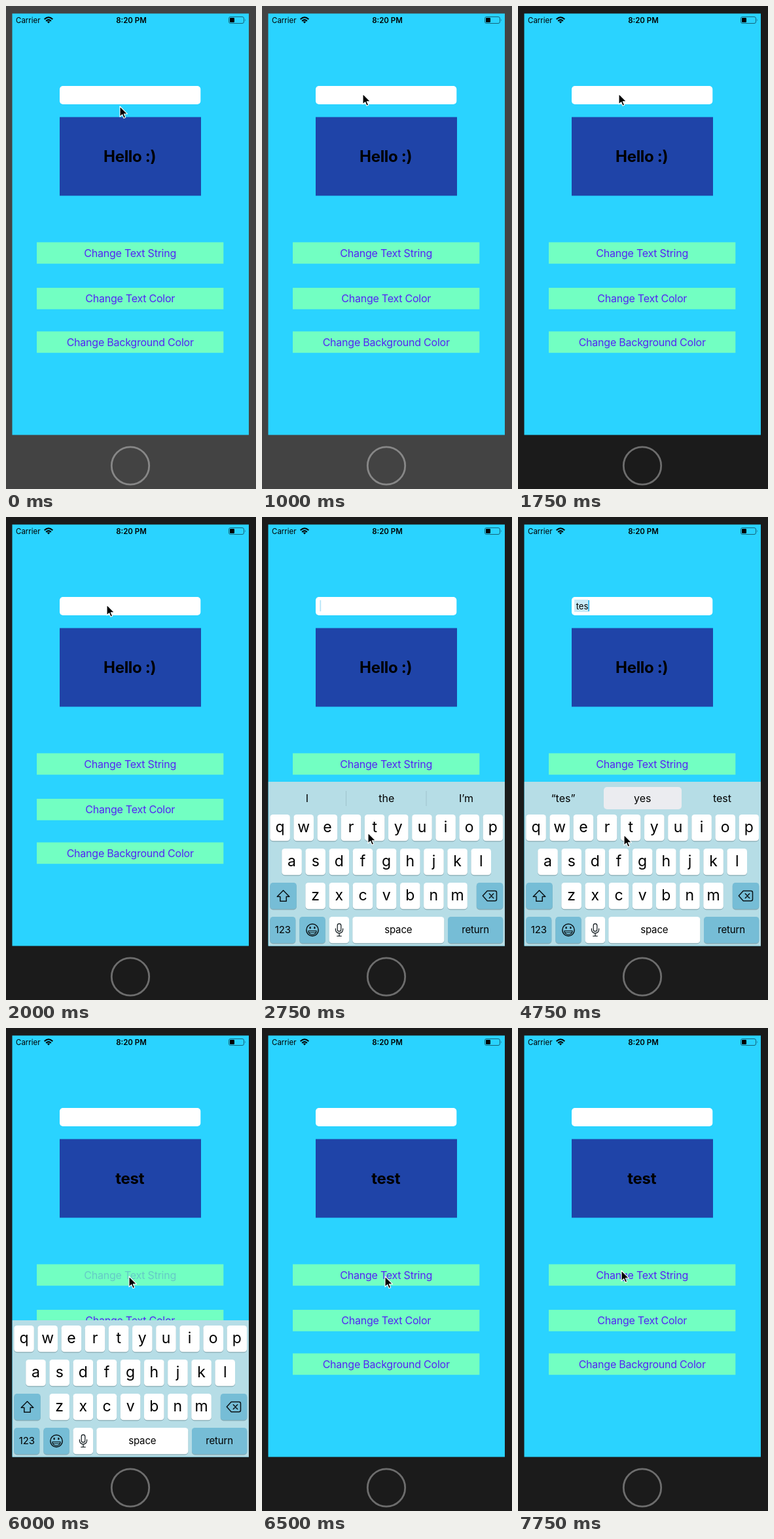
An HTML page that plays this animation: 382 px wide and 737 px high, repeating every 8000 ms.

```html
<!DOCTYPE html>
<html lang="en">
<head>
<meta charset="utf-8">
<style>
  html, body { margin: 0; width: 100%; height: 100%; overflow: hidden; background: #1b1b1b; }
  svg { display: block; width: 100vw; height: 100vh; font-family: Inter, "Open Sans", sans-serif; }
  .mid { text-anchor: middle; }
  .btn { font-size: 16px; letter-spacing: -.23px; fill: #5423f5; }
  .letter { font-size: 23px; }
  .word { font-size: 15px; letter-spacing: -.15px; }
  .hint { font-size: 16px; }
  .line { fill: none; stroke: #0b1418; stroke-width: 1.5; stroke-linejoin: round; stroke-linecap: round; }
</style>
</head>
<body>
<svg viewBox="0 0 382 737">
  <defs><clipPath id="screen"><rect x="9.5" y="11.5" width="361.5" height="643"/></clipPath></defs>
  <rect id="bezel" width="382" height="737"/>
  <circle id="home" cx="190" cy="701.5" r="28.7" fill="none" stroke-width="2.8"/>
  <rect x="9.5" y="11.5" width="361.5" height="643" fill="#2ad3ff"/>

  <text x="15" y="25.5" font-size="11.5">Carrier</text>
  <g fill="none" stroke="#000" stroke-width="2.1">
    <path d="M58.7 20.3Q65 14.2 71.3 20.3M61.2 22.9Q65 19.2 68.8 22.9"/>
    <path d="M62.8 24.1Q65 22.3 67.2 24.1L65 26.4Z" fill="#000" stroke="none"/>
  </g>
  <text class="mid" x="191.5" y="25.5" font-size="11.5" font-weight="600">8:20 PM</text>
  <rect x="340.5" y="16.5" width="23" height="10" rx="2.5" fill="none" stroke="#14657a"/>
  <rect x="342" y="18" width="7" height="7" rx="1" fill="#000"/>
  <path d="M365 19.7Q366.6 21.5 365 23.3Z" fill="#14657a"/>

  <rect x="82" y="122" width="215.3" height="28" rx="5" fill="#fff"/>
  <rect id="mark" x="86" y="126" height="19" fill="#c9ebf8"/>
  <text id="field" x="88.7" y="140.5" font-size="13.2"></text>
  <rect id="caret" y="127" width="1.8" height="17" fill="#2fb5ec"/>

  <rect x="82" y="169.5" width="216" height="120" fill="#1f44a8"/>
  <text id="label" class="mid" x="189.2" y="238" font-size="24" font-weight="700" letter-spacing="-.3"></text>

  <g id="buttons"></g>
  <g clip-path="url(#screen)"><g id="keyboard">
    <rect id="panel" x="9.5" width="361.5" fill="#b6dde6"/>
    <g id="bar">
      <path id="dividers" d="M128.5 418V441M251 418V441" stroke="#a0c4cd"/>
      <rect id="pick" x="131" y="412" width="119" height="34" rx="5" fill="#ebecf0"/>
    </g>
    <g id="keys"></g>
    <g class="line">
      <path d="M32.5 569.8L41.8 579.2H37.2V586.3H27.8V579.2H23.2Z"/>
      <path d="M344.2 570.5H356Q358.5 570.5 358.5 573V583.2Q358.5 585.7 356 585.7H344.2L337.3 578.1Z"/>
      <path d="M347.3 574.8L353.7 581.4M353.7 574.8L347.3 581.4"/>
      <circle cx="77" cy="630.3" r="9.2"/>
      <path d="M70.8 631.5H83.2A6.2 5.8 0 0 1 70.8 631.5ZM72 634H82" stroke-width="1.2"/>
      <path d="M73.6 626V627.4M80.4 626V627.4" stroke-width="2.2"/>
      <rect x="115.2" y="620.6" width="5.6" height="11.6" rx="2.8" stroke-width="1.2"/>
      <path d="M112.4 628V629.5A5.6 5.6 0 0 0 123.6 629.5V628M118 635.2V639.5M114.7 639.5H121.3" stroke-width="1.2"/>
    </g>
  </g></g>
  <path id="pointer" d="M0 0V16L3.7 12.7L6 18.2L8.7 17.1L6.3 11.7H11.4Z" stroke="#fff" stroke-width="1.1" stroke-linejoin="round"/>
</svg>
<script>
const LOOP = 8000, STEP = 250;
const $ = id => document.getElementById(id);

function add(parent, tag, attrs, text = "") {
  const el = document.createElementNS("http://www.w3.org/2000/svg", tag);
  for (const name in attrs) el.setAttribute(name, attrs[name]);
  el.textContent = text;
  parent.append(el);
  return el;
}
const set = (id, name, value) => $(id).setAttribute(name, value);
const show = (id, on) => set(id, "visibility", on ? "inherit" : "hidden");

const buttons = [["Change Text String", 360.5], ["Change Text Color", 430], ["Change Background Color", 496.5]]
  .map(([text, y]) => {
    add($("buttons"), "rect", { x: 47, y, width: 285.3, height: 32.7, fill: "#72ffc2" });
    return add($("buttons"), "text", { class: "mid btn", x: 189.7, y: y + 22 }, text);
  });

function key(x, y, width, text = "", dark = false, kind = "word") {
  const box = { x, width, height: 40.3, rx: 4.5 };
  add($("keys"), "rect", { ...box, y: y + 1.1, fill: "#86a9b2" });
  add($("keys"), "rect", { ...box, y, fill: dark ? "#76bdd6" : "#fff" });
  const base = y + (kind === "letter" ? 27 : 25.3);
  add($("keys"), "text", { class: "mid " + kind, x: x + width / 2, y: base }, text);
}
[["qwertyuiop", 12.3], ["asdfghjkl", 30.3], ["zxcvbnm", 66.4]].forEach(([row, x], r) =>
  [...row].forEach((c, i) => key(x + i * 36.15, 454 + r * 52, 30.5, c, false, "letter")));
key(12.3, 558, 40.5, "", true);
key(327.8, 558, 40.5, "", true);
key(12.3, 610, 39, "123", true);
key(57.3, 610, 39.5, "", true);
key(102.6, 610, 30.5);
key(138.3, 610, 140);
add($("keys"), "text", { class: "mid word", x: 208.3, y: 635.3 }, "space");
key(284, 610, 84.3, "return", true);

const hints = [69, 190.3, 312].map(x => add($("bar"), "text", { class: "mid hint", x, y: 435 }));

// time, x, y of the pointer tip; held until the next entry
const moves = [
  [0, 174, 153], [250, 173, 163], [500, 167, 156], [750, 158, 141], [1000, 154, 134],
  [2250, 156, 200], [2500, 160, 380], [2750, 162, 482],
  [3250, 124, 477], [3500, 99, 474], [3750, 101, 519],
  [4250, 114, 511], [4500, 143, 495], [4750, 162, 485],
  [5250, 167, 470], [5500, 178, 428], [5750, 188, 379],
  [7000, 108, 328], [7500, 142, 358], [7750, 158, 370]
];
const typed = [[0, ""], [3000, "t"], [3500, "te"], [4000, "tes"], [5000, "test"], [6000, ""]];
const slide = [[0, 255], [2250, 90], [2500, 0], [6250, 120], [6500, 255]];
const guesses = {
  "": ["I", "the", "I’m"],
  t: ["“t”", "the", "to"],
  te: ["“te”", "the", "tell"],
  tes: ["“tes”", "yes", "test"],
  test: ["“test”", "testing", "tests"]
};
const at = (list, t) => list.filter(e => e[0] <= t).pop();

function fillHints(word) {
  hints.forEach((el, i) => {
    el.textContent = guesses[word][i];
  });
  if (word === "te") {
    hints[2].textContent = "";
    [["t", .75], ["e", .3], ["ll", .8]].forEach(([c, o]) =>
      add(hints[2], "tspan", { "fill-opacity": o }, c));
  }
}

function draw(time) {
  const t = Math.floor(time / STEP) * STEP;
  const dim = t >= 1750, sent = t >= 6000;
  set("bezel", "fill", dim ? "#1b1b1b" : "#434343");
  set("home", "stroke", dim ? "#6d6d6d" : "#878787");

  const [, x, y] = at(moves, t);
  set("pointer", "transform", `translate(${x} ${y})`);

  const word = at(typed, t)[1];
  $("field").textContent = word;
  const end = 88.7 + (word ? $("field").getComputedTextLength() : 0);
  const corrected = word === "tes";
  show("mark", corrected);
  set("mark", "width", end - 86);
  show("caret", t >= 2250 && !sent);
  set("caret", "x", end - .3);
  set("caret", "opacity", t === 2750 ? .35 : 1);

  $("label").textContent = sent ? "test" : "Hello :)";
  buttons[0].style.fill = t === 5750 || t === 6000 ? "#66c9c7" : "";

  set("keyboard", "transform", `translate(0 ${at(slide, t)[1]})`);
  set("panel", "y", sent ? 446 : 404);
  set("panel", "height", sent ? 209 : 251);
  show("bar", !sent);
  const chosen = word === "te" || corrected;
  show("pick", chosen);
  show("dividers", !chosen);
  fillHints(word);
}

let last = -1;
function tick(now) {
  const time = now % LOOP, step = Math.floor(time / STEP);
  if (step !== last) draw(time);
  last = step;
  requestAnimationFrame(tick);
}
draw(0);
requestAnimationFrame(tick);
</script>
</body>
</html>
```
